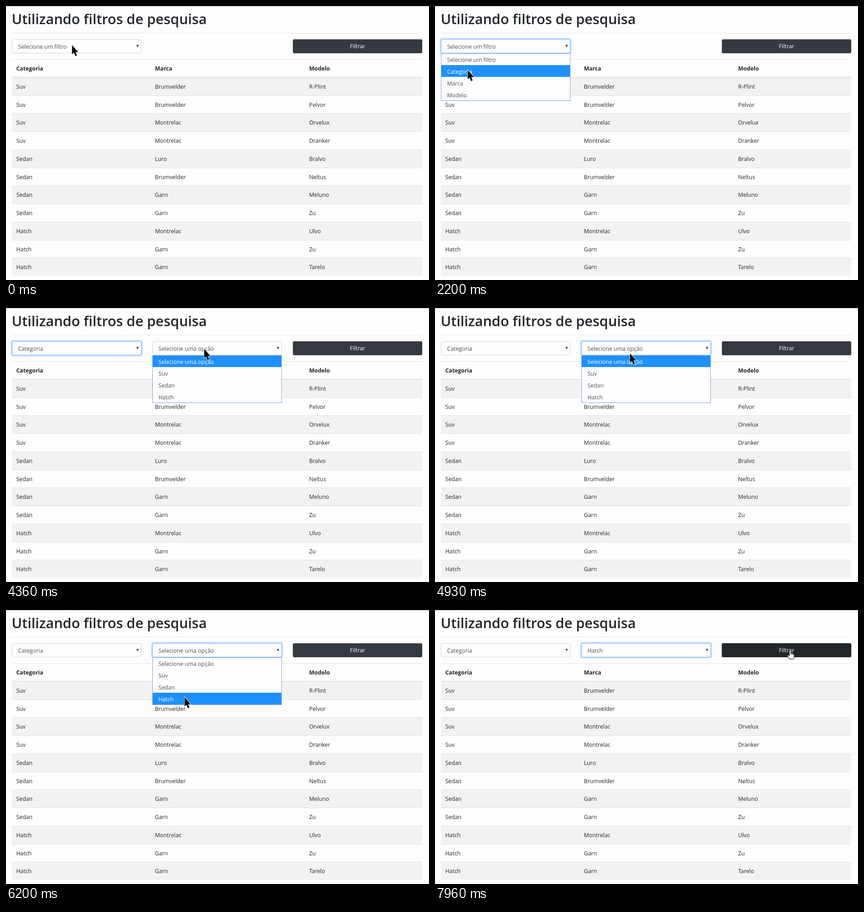
An HTML page that plays this animation: 928x603 px, repeating every 8 s.

```html
<!DOCTYPE html>
<html lang="pt-BR">
<head>
<meta charset="utf-8">
<title>Utilizando filtros de pesquisa</title>
<style>
  html, body { margin: 0; width: 100%; height: 100%; overflow: hidden; background: #fefefe; }
  svg { display: block; width: 100vw; height: 100vh; font: 12.3px "Open Sans", "Noto Sans", sans-serif; }
  text { white-space: pre; }
</style>
</head>
<body>
<svg id="stage" viewBox="0 0 928 603"></svg>
<script>
const LOOP = 8000, FPS = 30;
const INK = "#212529", FIELD_INK = "#495057", LINE = "#dee2e6";
const stage = document.getElementById("stage");

function add(parent, tag, attrs, content) {
  const node = document.createElementNS("http://www.w3.org/2000/svg", tag);
  for (const key in attrs) node.setAttribute(key, attrs[key]);
  if (content !== undefined) node.textContent = content;
  parent.appendChild(node);
  return node;
}
const box = (parent, x, y, width, height, fill, more) =>
  add(parent, "rect", { x, y, width, height, fill, ...more });
const label = (parent, x, y, content, fill = INK, more) =>
  add(parent, "text", { x, y, fill, ...more }, content);
const show = (node, on) => node.setAttribute("display", on ? "inline" : "none");

// Page
box(stage, 0, 0, 928, 603, "#fefefe");
box(stage, 0, 0, 928, 1, "#b8b8b8");
label(stage, 12.5, 40, "Utilizando filtros de pesquisa", INK, { "font-size": 30.6, "font-weight": 600 });
box(stage, 13, 59, 900, 1, "#e5e5e5");

// Table
const columns = [22.5, 326.7, 665];
const rows = [
  ["Suv", "Brumvelder", "R-Plint"],
  ["Suv", "Brumvelder", "Pelvor"],
  ["Suv", "Montrelac", "Orvelux"],
  ["Suv", "Montrelac", "Dranker"],
  ["Sedan", "Luro", "Bralvo"],
  ["Sedan", "Brumvelder", "Neltus"],
  ["Sedan", "Garn", "Meluno"],
  ["Sedan", "Garn", "Zu"],
  ["Hatch", "Montrelac", "Ulvo"],
  ["Hatch", "Garn", "Zu"],
  ["Hatch", "Garn", "Tarelo"]
];
const rowTop = i => Math.floor(157.4 + 39.74 * i);
box(stage, 13, 117, 900, 1, LINE);
["Categoria", "Marca", "Modelo"].forEach((name, c) =>
  label(stage, columns[c], 142, name, INK, { "font-weight": 700 }));
rows.forEach((row, i) => {
  const y = rowTop(i);
  if (i % 2 === 0) box(stage, 13, y, 900, rowTop(i + 1) - y, "#f2f2f2");
  box(stage, 13, i ? y : 156, 900, i ? 1 : 1.6, LINE);
  row.forEach((cell, c) => label(stage, columns[c], Math.round(182 + 39.73 * i), cell));
});

// Button
const buttonFace = fill => box(stage, 629.3, 73.2, 283.9, 30.8, fill, { rx: 3.2 });
buttonFace("#343a40");
const hover = buttonFace("#23272b");
label(stage, 771.3, 93, "Filtrar", "#fff", { "text-anchor": "middle" });

// Select field with its focus ring and option list
function makeSelect(x, options) {
  const root = add(stage, "g", {});
  const ring = box(root, x - 2.6, 70.4, 289.2, 36.2, "#bfdeff", { rx: 5.5 });
  const frame = { rx: 3, "stroke-width": 1 };
  box(root, x + 0.5, 73.5, 283, 30, "#fefefe", { ...frame, stroke: "#ced4da" });
  const edge = box(root, x + 0.5, 73.5, 283, 30, "none", { ...frame, stroke: "#80bdff" });
  const value = label(root, x + 13.4, 94, options[0], FIELD_INK);
  add(root, "path", { d: `M${x + 273} 85.7h5.4l-2.7 5.2z`, fill: "#343a40" });

  const list = add(stage, "g", {});
  box(list, x + 0.5, 104.5, 283, 104, "#fefefe", { stroke: "#7f9fdb" });
  const bar = box(list, x + 1, 105, 282, 25, "#1e90ff");
  const items = options.map((name, i) => label(list, x + 13.4, 123 + 26 * i, name, FIELD_INK));

  return function update(visible, open, choice, focus, active) {
    show(root, visible);
    show(list, open);
    ring.setAttribute("opacity", focus);
    edge.setAttribute("opacity", focus);
    value.textContent = options[choice];
    bar.setAttribute("y", active ? 104 + 26 * active : 105);
    bar.setAttribute("height", active ? 26 : 25);
    items.forEach((item, i) => item.setAttribute("fill", i === active ? "#fff" : FIELD_INK));
  };
}
const filterSelect = makeSelect(13, ["Selecione um filtro", "Categoria", "Marca", "Modelo"]);
const optionSelect = makeSelect(321, ["Selecione uma opção", "Suv", "Sedan", "Hatch"]);

// Pointer
const arrow = add(stage, "path", {
  d: "M.8-2V18.3L5 14.6 8.1 22.2 11.6 20.7 8.4 13.4H14.2Z",
  fill: "#000", stroke: "#fff", "stroke-width": 1.6, "paint-order": "stroke"
});
const hand = add(stage, "g", { stroke: "#000", "stroke-width": 1, fill: "#fff", "stroke-linejoin": "round" });
add(hand, "path", {
  d: "M-1.7 1.8Q-1.7 0 0 0T1.7 1.8V6.5Q4 5.6 4.4 7.3Q6.6 6.6 7 8.3Q9 8 9 10V14Q9 17 7.2 20H-1.5Q-2 18-5.5 13.5Q-6.5 11.5-4.5 11.2Q-3 11.2-1.7 13Z"
});
add(hand, "path", { d: "M1.7 6.5v4M4.4 7.5v3.3M7 8.5v3", fill: "none" });

const clamp = v => Math.max(0, Math.min(1, v));
const ramp = (t, start, length) => clamp((t - start) / length);
const smooth = p => p * p * (3 - 2 * p);
const out = power => p => 1 - (1 - p) ** power;

// start, end, x, y, easing of x, easing of y
const moves = [
  [1659, 1660, 143, 88],
  [1770, 2200, 71, 143],
  [3370, 3960, 434, 92, out(2), smooth],
  [4800, 5260, 401, 143],
  [5429, 5430, 400, 142],
  [5970, 6300, 388, 209],
  [6500, 6700, 388, 197],
  [7372, 7960, 779, 88, out(2), out(4)]
];
function pointerAt(t) {
  let x = 144, y = 88;
  for (const [start, end, toX, toY, easeX = smooth, easeY = smooth] of moves) {
    const p = ramp(t, start, end - start);
    x += (toX - x) * easeX(p);
    y += (toY - y) * easeY(p);
  }
  return [x, y];
}

const recorded = t => Math.floor((t + 7) * FPS / 1000) * 1000 / FPS;

function draw(t) {
  const [x, y] = pointerAt(t);
  const active = Math.max(0, Math.min(3, Math.floor((y - 104) / 26)));
  const handover = smooth(ramp(t, 4370, 130));

  filterSelect(true, t >= 730 && t < 2760, t >= 2760 ? 1 : 0,
    smooth(ramp(t, 750, 180)) * (1 - handover), active);
  optionSelect(t >= 2830, t >= 4360 && t < 7000, t >= 7000 ? 3 : 0, handover, active);

  const overButton = x >= 629 && y >= 73 && y < 104;
  hover.setAttribute("opacity", smooth(ramp(t, 7600, 150)));
  show(arrow, !overButton);
  show(hand, overButton);
  const place = `translate(${Math.round(x)} ${Math.round(y)})`;
  arrow.setAttribute("transform", place);
  hand.setAttribute("transform", place);
}

const began = performance.now();
function tick() {
  draw(recorded((performance.now() - began) % LOOP));
  requestAnimationFrame(tick);
}
draw(0);
requestAnimationFrame(tick);
</script>
</body>
</html>
```
